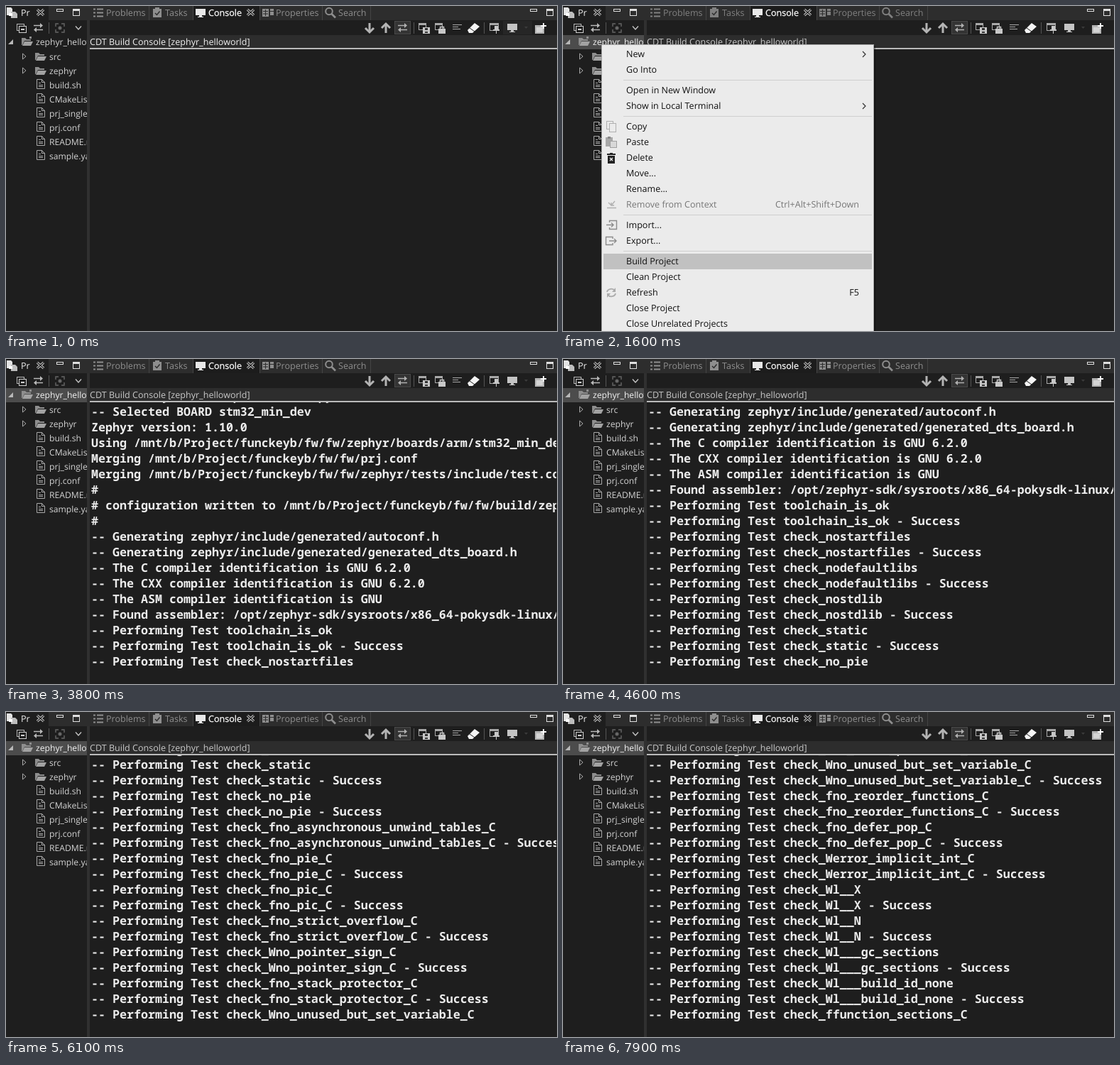
Write an HTML page that moves like this. It is 776 px wide and 458 px high and loops after 8 s.

```html
<!DOCTYPE html>
<html lang="en">
<head>
<meta charset="utf-8">
<title>Build console</title>
<style>
html, body { margin: 0; width: 100%; height: 100%; overflow: hidden; background: #1e1e1e; }
svg { display: block; }
text { font: 12.55px "Open Sans", "Noto Sans", sans-serif; white-space: pre; text-rendering: geometricPrecision; }
#tree text { font-size: 12.15px; }
#log text { font: bold 16.667px "Noto Sans Mono", "DejaVu Sans Mono", monospace; fill: #ececec; }
</style>
</head>
<body>
<svg id="stage" width="776" height="458" viewBox="0 0 776 458"></svg>
<script>
const LOOP = 8000;
const ROOT = '/mnt/b/Project/funckeyb/fw/fw';
const TESTS = `nostartfiles nodefaultlibs nostdlib static no_pie
  fno_asynchronous_unwind_tables_C fno_pie_C fno_pic_C fno_strict_overflow_C
  Wno_pointer_sign_C fno_stack_protector_C Wno_unused_but_set_variable_C
  fno_reorder_functions_C fno_defer_pop_C Werror_implicit_int_C Wl__X Wl__N
  Wl___gc_sections Wl___build_id_none ffunction_sections_C`.split(/\s+/);

const lines = [
  '**** Build of configuration Default for project zephyr_helloworld ****',
  'bash build.sh',
  `CMake Deprecation Warning at ${ROOT}/zephyr/cmake/app/boilerplate.cmake:37 (cmake_policy):`,
  '  The OLD behavior for policy CMP0000 will be removed from a future version',
  '  of CMake.',
  '',
  '  The cmake-policies(7) manual explains that the OLD behaviors of all',
  '  policies are deprecated and that a policy should be set to OLD only under',
  '  specific short-term circumstances.  Projects should be ported to the NEW',
  '  behavior and not rely on setting a policy to OLD.',
  'Call Stack (most recent call first):',
  '  CMakeLists.txt:3 (include)',
  '',
  '',
  '-- Found PythonInterp: /usr/bin/python3 (found suitable version "3.5.2")',
  '-- Selected BOARD stm32_min_dev',
  'Zephyr version: 1.10.0',
  `Using ${ROOT}/zephyr/boards/arm/stm32_min_dev/stm32_min_dev_defconfig as base`,
  `Merging ${ROOT}/prj.conf`,
  `Merging ${ROOT}/zephyr/tests/include/test.config`,
  '#',
  `# configuration written to ${ROOT}/build/zephyr/.config`,
  '#',
  '-- Generating zephyr/include/generated/autoconf.h',
  '-- Generating zephyr/include/generated/generated_dts_board.h',
  '-- The C compiler identification is GNU 6.2.0',
  '-- The CXX compiler identification is GNU 6.2.0',
  '-- The ASM compiler identification is GNU',
  '-- Found assembler: /opt/zephyr-sdk/sysroots/x86_64-pokysdk-linux/usr/bin',
  ...['toolchain_is_ok', ...TESTS.map(t => 'check_' + t)].flatMap(t =>
    [`-- Performing Test ${t}`, `-- Performing Test ${t} - Success`])
];

// [time, index of the last printed line]
const prints = [[0, -1], [2000, 1], [2100, 13], [2400, 19], [2700, 24], [3300, 26], [3500, 29]];
const addRun = (start, count, first, gap = 200) => {
  for (let i = 0; i < count; i++) prints.push([start + i * gap, first + 2 * i]);
};
addRun(3800, 5, 31);
addRun(4900, 8, 41);
addRun(6700, 5, 57);
prints.push([7600, 67], [7800, 68], [7900, 69]);

// [time, centre of the hovered menu row]; 0 means none
const hovers = [[0, 0], [1300, 119], [1400, 214], [1500, 309], [1600, 360]];

const esc = s => s.replace(/&/g, '&amp;').replace(/</g, '&lt;');
const text = (x, y, s, fill = '#d0d0d0', more = '') => `<text x="${x}" y="${y}" fill="${fill}" ${more}>${esc(s)}</text>`;
const rect = (x, y, w, h, fill, more = '') => `<rect x="${x}" y="${y}" width="${w}" height="${h}" fill="${fill}" ${more}/>`;
const box = (x, y, w, h, color, fill = 'none') => rect(x + .5, y + .5, w - 1, h - 1, fill, `stroke="${color}"`);
const fillPath = (d, color) => `<path d="${d}" fill="${color}"/>`;
const line = (d, color, width = 1) => `<path d="${d}" fill="none" stroke="${color}" stroke-width="${width}"/>`;
const at = (x, y, s) => `<g transform="translate(${x} ${y})">${s}</g>`;

const closeX = x => at(x, 4,
  line('M1 1 10 9M10 1 1 9', '#c8c8c8', 3.4) + line('M1 1 10 9M10 1 1 9', '#1e1e1e', 1.2));
const windowButtons = x => box(x, 4, 10, 4, '#e0e0e0') +
  box(x + 23, 4, 10, 10, '#e0e0e0') + rect(x + 23, 4, 10, 3, '#e0e0e0');
const monitor = (x, y, c) => at(x, y, rect(0, 0, 14, 9, c) + rect(5, 9, 4, 2, c) + rect(3, 11, 8, 1, c));
const swap = (x, y, c) => at(x, y,
  line('M0 3.5H10M3 9.5H13', c, 1.6) + fillPath('M9 0 13 3.5 9 7ZM4 6 0 9.5 4 13Z', c));
const folder = (x, y) => at(x, y,
  fillPath('M0 11V1H5L7 3H13V5H4L1 11Z', '#8e8e8e') + fillPath('M4 6H16L13 12H1Z', '#a2a2a2'));
const page = (x, y) => at(x, y,
  line('M.5 .5H7.5L11.5 4.5V13.5H.5ZM7.5 .5V4.5H11.5M3 5.5H6M3 8.5H9M3 10.5H9', '#a8a8a8'));
const bigArrow = (x, turn) => `<g transform="translate(${x} 31) rotate(${turn})">` +
  line('M0 -7V4', '#b4b4b4', 3) + line('M-6 0 0 6 6 0', '#b4b4b4', 3) + '</g>';
const separator = x => rect(x, 23, 1, 16, '#555');

function tree() {
  const kids = ['src', 'zephyr', 'build.sh', 'CMakeLists.txt', 'prj_single.conf', 'prj.conf', 'README.rst', 'sample.yaml'];
  let out = rect(0, 41, 114, 20, '#4c4c4c', 'id="selection"');
  out += fillPath('M10 47V54H3Z', '#b8b8b8') + folder(22, 44) + rect(33, 43, 3, 3, '#8e8e8e');
  out += text(42, 55, 'zephyr_helloworld', 'currentColor', 'id="project"');
  kids.forEach((name, i) => {
    const y = 71 + 20 * i;
    out += i < 2
      ? line(`M23.5 ${y - 4}L28 ${y}L23.5 ${y + 4}Z`, '#aaa') + folder(41, y - 6)
      : page(43, y - 8);
    out += text(61, y + 5, name, '#d4d4d4');
  });
  return `<g id="tree" clip-path="url(#left)">${out}</g>`;
}

function tabs() {
  const c = 'currentColor';
  let out = rect(0, 0, 776, 20, '#2d2d2d') + rect(0, 0, 60, 20, '#1e1e1e') + rect(263, 0, 94, 20, '#1c1c1c');
  out += fillPath('M1 2H7L9 4V13H1Z', '#e4e4e4') + fillPath('M7 8H13L16 11V17H7Z', '#bdbdbd') + rect(4, 10, 5, 4, '#fff');
  out += text(21, 14, 'Pr', '#f0f0f0') + closeX(43) + windowButtons(71) + windowButtons(738);
  out += [201, 263, 357, 445, 513].map(x => rect(x, 0, 1, 20, '#444')).join('');
  let dim = line('M123 4.5H126M123 9.5H126M123 14.5H126M128 4.5H137M128 9.5H137M128 14.5H137', c, 2);
  dim += at(207, 2, fillPath('M0 2H3V0H9V2H12V14H0Z', c) + line('M3 8 5.5 10.5 9.5 5.5', '#2d2d2d', 1.5));
  dim += at(361, 4, rect(0, 0, 9, 11, c) + line('M1 3.5H8M1 7H8M4.5 1V10', '#2d2d2d') + rect(11, 0, 5, 3, c) + rect(11, 4, 5, 5, c));
  dim += '<circle cx="455" cy="7.5" r="4.8" fill="none" stroke="currentColor" stroke-width="2"/>' + line('M458.5 11 464 16.5', c, 2.6);
  dim += [['Problems', 141], ['Tasks', 224], ['Properties', 380], ['Search', 468]]
    .map(([s, x]) => text(x, 14, s, c)).join('');
  out += `<g id="tabs">${dim}</g>`;
  return out + monitor(267, 4, '#e8e8e8') + text(285, 14, 'Console', '#fff', 'stroke="#fff" stroke-width=".25"') + closeX(339);
}

function toolbars() {
  let out = rect(0, 20, 776, 21, '#1e1e1e');
  out += box(15, 25, 11, 10, '#b8b8b8') + box(18, 28, 11, 10, '#d0d0d0', '#1e1e1e') + rect(21, 32, 5, 2, '#d0d0d0');
  out += swap(39, 24, '#b8b8b8') + separator(60);
  out += at(69, 24, line('M1 5V1H5M9 1H13V5M13 9V13H9M5 13H1V9', '#666', 1.4) + '<circle cx="7" cy="7" r="2.5" fill="#666"/>');
  out += line('M98 28.5 102 33 106 28.5', '#c8c8c8', 1.3);
  out += bigArrow(512, 0) + bigArrow(535, 180);
  out += box(547, 21, 23, 19, '#4a4a4a', '#343434') + swap(552, 24, '#b0b0b0') + separator(574);
  out += at(581, 23, box(0, 1, 11, 10, '#aaa') + rect(1, 2, 9, 2, '#aaa') + rect(6, 7, 10, 9, '#c8c8c8') + rect(9, 8, 4, 3, '#333') + rect(9, 13, 4, 2, '#333'));
  out += at(604, 23, box(0, 1, 11, 10, '#aaa') + rect(1, 2, 9, 2, '#aaa') + rect(5, 9, 10, 7, '#c8c8c8') + line('M7.5 9V6.5H12.5V9', '#c8c8c8', 1.5));
  out += line('M629 26.5H642M629 29.5H637M629 32.5H640', '#aaa');
  out += fillPath('M650 34 660 24 667 29 657 38H652Z', '#f4f4f4') + line('M653 31 660 36', '#1e1e1e');
  out += separator(673);
  out += at(681, 24, box(0, 0, 13, 11, '#aaa') + rect(0, 0, 13, 3, '#aaa') + fillPath('M7 4H12V9H14V11H10V15H9V11H5V9H7Z', '#c8c8c8'));
  out += rect(700, 21, 41, 19, '#262626', 'id="hot"') + monitor(706, 25, '#c4c4c4') + fillPath('M730 29H735L732.5 32Z', '#3c3c3c');
  out += at(745, 24, rect(0, 3, 13, 12, '#b4b4b4') + rect(2, 6, 9, 7, '#d4d4d4') + line('M12 0V8M8 4H16', '#fff', 1.8));
  out += rect(118, 41, 658, 18, '#2d2d2d') + text(118, 55, 'CDT Build Console [zephyr_helloworld]', 'currentColor', 'id="title"');
  return out + rect(118, 59.25, 658, 1.5, '#f0f0f0') + rect(114, 20, 4, 438, '#303030');
}

function menu() {
  const grey = '#8c8c8c';
  const items = [[68, 'New', '>'], [90, 'Go Into'], [119, 'Open in New Window'], [141, 'Show in Local Terminal', '>'],
    [170, 'Copy'], [192, 'Paste'], [214, 'Delete'], [236, 'Move...'], [258, 'Rename...'],
    [280, 'Remove from Context', 'Ctrl+Alt+Shift+Down'], [309, 'Import...'], [331, 'Export...'],
    [360, 'Build Project'], [382, 'Clean Project'], [404, 'Refresh', 'F5'], [426, 'Close Project'], [448, 'Close Unrelated Projects']];
  let out = rect(56, 56, 384, 402, '#000', 'opacity=".35"') + box(54, 54, 384, 410, '#a8a8a8', '#ebebeb');
  out += rect(57, 0, 378, 22, '#c1c1c1', 'id="hover"');
  out += [104, 155, 294, 345].map(y => rect(85, y, 350, 1, '#cfcfcf')).join('');
  for (const [y, name, key] of items) {
    const ink = y === 280 ? '#777' : '#111';
    out += text(89, y + 4, name, ink);
    if (key === '>') out += line(`M422 ${y - 4}L426 ${y}L422 ${y + 4}`, '#333', 1.2);
    else if (key) out += text(417, y + 4, key, ink, 'text-anchor="end"');
  }
  out += at(61, 162, box(0, 0, 10, 12, '#b0b0b0') + box(4, 3, 10, 13, '#b0b0b0', '#ebebeb'));
  out += at(60, 184, rect(0, 1, 10, 13, '#a8a8a8') + rect(3, 0, 4, 3, '#888') + box(6, 6, 10, 10, '#a0a0a0', '#d8d8d8'));
  out += at(62, 207, rect(0, 1, 12, 2, '#222') + rect(4, 0, 4, 2, '#222') + rect(1, 4, 10, 11, '#222') + line('M4 7 8 11M8 7 4 11', '#eee', 1.4));
  out += line('M62 284.5H75M64 277 68 281 73 275M68 277V281H72', '#b0b0b0', 1.4);
  const door = line('M4.5 3V.5H14.5V12.5H4.5V10', grey, 1.4);
  out += at(61, 302, door + line('M0 6.5H10M7 3.5 10 6.5 7 9.5', grey, 1.4));
  out += at(60, 325, line('M10 3V.5H.5V11.5H10V9', grey, 1.4) + line('M5 6H15M12 3 15 6 12 9', grey, 1.4));
  out += at(61, 397, line('M1 6A6 5 0 0 1 12 4M13 8A6 5 0 0 1 2 10', '#aaa', 1.8) + fillPath('M13 0V6H8ZM1 14V8H6Z', '#aaa'));
  return `<g id="menu">${out}</g>`;
}

const stage = document.getElementById('stage');
stage.innerHTML = `<defs><clipPath id="left">${rect(0, 41, 114, 417, '#fff')}</clipPath>
  <clipPath id="view">${rect(118, 61, 657, 376, '#fff')}</clipPath></defs>` +
  rect(0, 0, 776, 458, '#1e1e1e') + tabs() + toolbars() + tree() +
  `<g clip-path="url(#view)"><g id="log">${lines.map((s, i) => text(120, 80 + 22 * i, s)).join('')}</g></g>` +
  menu();

const $ = id => document.getElementById(id);
const rows = [...$('log').children];
const pick = (table, t) => table.reduce((v, [time, value]) => t >= time ? value : v, table[0][1]);
const show = (el, on) => { el.style.display = on ? '' : 'none'; };

function draw(t) {
  const last = pick(prints, t);
  rows.forEach((row, i) => show(row, i <= last));
  $('log').setAttribute('transform', `translate(0 ${-22 * Math.max(0, last - 16)})`);
  show($('selection'), t >= 200);
  $('selection').style.opacity = t < 400 ? .6 : 1;
  $('project').style.color = t < 200 ? '#d4d4d4' : '#f4f4f4';
  show($('hot'), t < 400);
  $('title').style.color = t < 400 ? '#f0f0f0' : '#c8c8c8';
  $('tabs').style.color = t >= 700 && t < 2000 ? '#808080' : '#8e8e8e';
  show($('menu'), t >= 1200 && t < 1900);
  const row = pick(hovers, t);
  show($('hover'), row > 0);
  $('hover').setAttribute('y', row - 11);
}

const start = performance.now();
function tick() {
  draw((performance.now() - start) % LOOP);
  requestAnimationFrame(tick);
}
tick();
</script>
</body>
</html>
```
